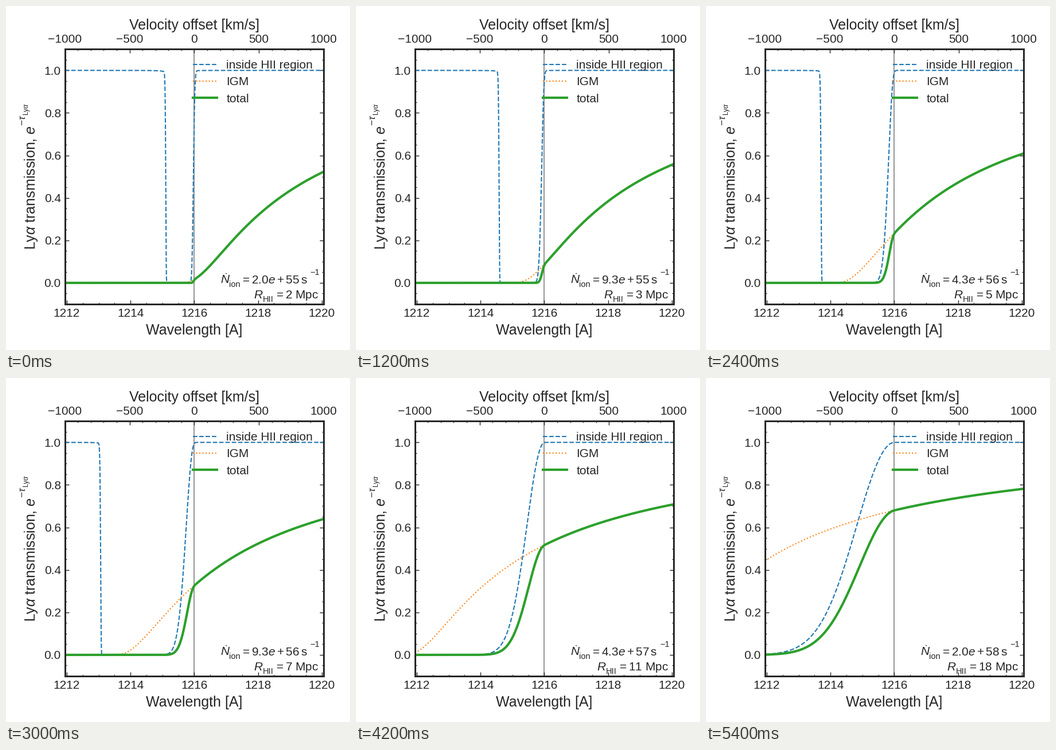
A matplotlib script that plays this animation: 600 px wide and 600 px high, repeating every 6 s.

```python
import numpy as np
import matplotlib.pyplot as plt
from matplotlib.animation import FuncAnimation
from matplotlib.ticker import AutoMinorLocator, MultipleLocator

SIZE = 600
INK = "0.15"
FRAMES = 10
LINE_CENTRE = 1216.0   # Angstrom
LIGHT = 299792.0       # km/s
THERMAL = 12.85        # Doppler width, km/s
DAMPING = 0.006        # natural width, km/s
DIGIT = 11.6           # advance of one digit, pixels

plt.rcParams.update({
    "font.family": "Liberation Sans",
    "font.size": 15,
    "mathtext.fontset": "custom",
    "mathtext.rm": "Liberation Sans",
    "mathtext.it": "Liberation Sans:italic",
    "mathtext.bf": "Liberation Sans:bold",
    "text.color": INK,
    "axes.edgecolor": INK,
    "axes.linewidth": 2,
    "xtick.color": INK,
    "ytick.color": INK,
})

velocity = np.linspace(-1000, 1000, 1201)
wavelength = LINE_CENTRE * (1 + velocity / LIGHT)


def bubble_tau(edge, scale):
    """Residual gas in the bubble: opacity grows with distance squared."""
    s = np.linspace(0, edge, int(edge) + 2)
    step = s[1] - s[0]
    gap2 = (velocity[:, None] + s) ** 2
    core = np.exp(-gap2 / THERMAL**2) / (THERMAL * np.sqrt(np.pi))
    wing = DAMPING / np.pi / (gap2 + 2 * THERMAL**2)
    weight = scale * s**2 * step
    weight[-1] /= 2
    return (core + wing) @ weight


def wing_tau(edge):
    """Damping wing of the neutral gas beyond the bubble."""
    return 805.8 / np.maximum(velocity + edge, 1e-2) - 0.026


def curves(k):
    growth = 10 ** (k / 3)
    edge = 195.8 * growth ** (1 / 3)
    inside = np.exp(-bubble_tau(edge, 5.89e-3 / growth))
    igm = np.exp(-wing_tau(edge))
    return inside, igm, inside * igm


def put(x, y, text, **kw):
    """Place text by its baseline, in pixels from the top left."""
    return fig.text(x / SIZE, 1 - y / SIZE, text, va="baseline", **kw)


def put_up(x, y, text, size):
    return put(x, y, text, fontsize=size, rotation=90, rotation_mode="anchor")


fig = plt.figure(figsize=(6, 6), dpi=100, facecolor="white")
left, right, top, bottom = 102.8, 554, 75.2, 520
ax = fig.add_axes([left / SIZE, 1 - bottom / SIZE,
                   (right - left) / SIZE, (bottom - top) / SIZE])
ax.set_xlim(wavelength[0], wavelength[-1])
ax.set_ylim(-0.1, 1.1)
ax.xaxis.set_major_locator(MultipleLocator(2))
ax.yaxis.set_major_locator(MultipleLocator(0.2))
ax.ticklabel_format(axis="x", useOffset=False)

vax = ax.twiny()
vax.set_xlim(-1000, 1000)
vax.xaxis.set_major_locator(MultipleLocator(500))

for axis, parts in ((ax.xaxis, 4), (ax.yaxis, 4), (vax.xaxis, 5)):
    axis.set_minor_locator(AutoMinorLocator(parts))
    axis.set_tick_params(which="major", direction="in", length=5, width=1, pad=5)
    axis.set_tick_params(which="minor", direction="in", length=2, width=0.8)
ax.tick_params(axis="y", which="both", right=True)

ax.axvline(LINE_CENTRE, color="gray", lw=1.2, zorder=0)
lines = [
    ax.plot([], [], "--", color="tab:blue", lw=1.5, label="inside HII region")[0],
    ax.plot([], [], ":", color="tab:orange", lw=1.5, label="IGM")[0],
    ax.plot([], [], "-", color="tab:green", lw=3, label="total")[0],
]
ax.legend(loc="upper right", frameon=False, fontsize=15)

middle = (left + right) / 2
put(middle, 572.5, "Wavelength [A]", ha="center", fontsize=18)
put(middle, 41, "Velocity offset [km/s]", ha="center", fontsize=18)

# Sub- and superscripts sit further from the baseline than mathtext puts them.
put_up(51, 425, r"Ly$\alpha$ transmission, $e$", 18)
put_up(33.6, 209, r"$-\tau$", 12.6)
put_up(38.8, 191.5, r"$\mathrm{Ly}\alpha$", 8.8)

put(373.5, 483.5, r"$\dot{N}$")
put(389.5, 489.7, "ion", fontsize=10.5)
rate_text = put(409, 483.5, "")
put(530.5, 469, "\N{MINUS SIGN}1", fontsize=10.5)

radius_sign = put(0, 510, "$R$")
radius_sub = put(0, 516.2, "HII", fontsize=10.5)
radius_text = put(545.5, 510, "", ha="right")


def update(k):
    for line, values in zip(lines, curves(k)):
        line.set_data(wavelength, values)
    rate = f"{2e55 * 10 ** (k / 3):.1e}"
    rate_text.set_text(rf"$= {rate}\,\mathrm{{s}}$")
    radius = f"{1.82 * 10 ** (k / 9):.0f}"
    radius_text.set_text(f"$= {radius}$ Mpc")
    shift = DIGIT * (len(radius) - 1)
    radius_sign.set_x((431.5 - shift) / SIZE)
    radius_sub.set_x((447.5 - shift) / SIZE)
    return [*lines, rate_text, radius_sign, radius_sub, radius_text]


anim = FuncAnimation(fig, update, frames=FRAMES, interval=600,
                     init_func=lambda: update(0), repeat=True, blit=False)
plt.show()
```
